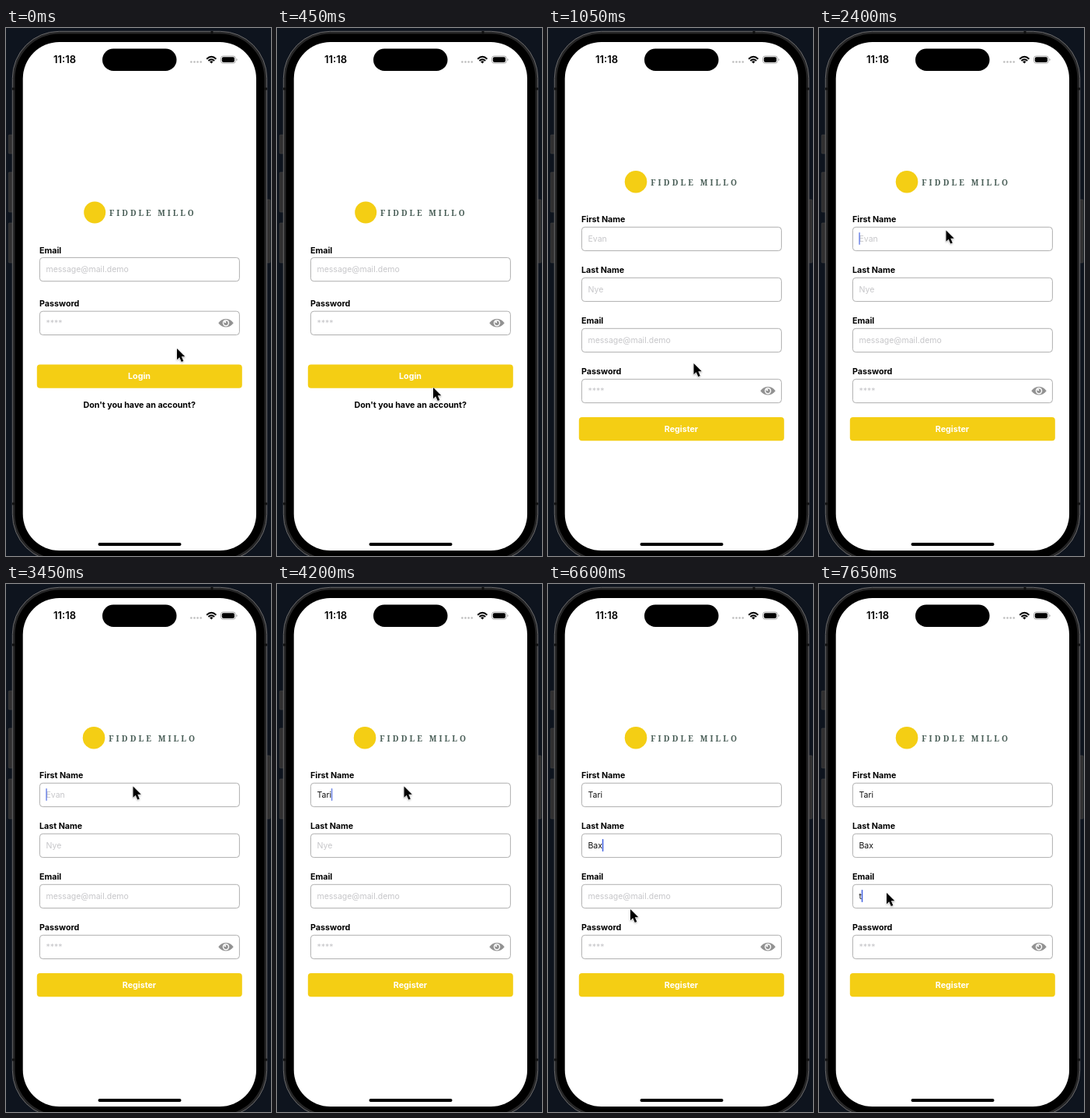
An HTML page that plays this animation: 341 px wide and 677 px high, repeating every 8 s.

```html
<!DOCTYPE html>
<html lang="en">
<head>
<meta charset="utf-8">
<title>Sign up</title>
<style>
  html, body { margin: 0; width: 100%; height: 100%; overflow: hidden; background: #0e141e; }
  svg { display: block; width: 100%; height: 100%; }
  text { font-family: Inter, "Liberation Sans", sans-serif; font-size: 10.5px; fill: #111; white-space: pre; }
  .bold { font-size: 10.7px; font-weight: 700; fill: #000; }
  .mid { text-anchor: middle; }
  .white { fill: #fff; }
  .hint { fill: #c6c6c9; }
  .brand { font: 700 10px "Noto Serif", "Liberation Serif", serif; letter-spacing: 3px; fill: #495e57; }
  .clock { font-size: 13px; font-weight: 600; fill: #000; }
</style>
</head>
<body>
<svg viewBox="0 0 341 677">
  <defs>
    <g id="eye">
      <path d="M-9.7 0C-5 -7 5 -7 9.7 0C5 7 -5 7 -9.7 0Z" fill="#929292"/>
      <circle r="4.2" fill="#fff"/>
      <circle r="2.8" fill="#929292"/>
      <circle cx="-1" cy="-1.2" r="1.2" fill="#fff"/>
    </g>
  </defs>

  <rect width="341" height="677" fill="#0e141e"/>
  <g fill="#302f30" stroke="#454546" stroke-width=".6">
    <rect x="3.3" y="137" width="6" height="24" rx="1"/>
    <rect x="3.3" y="185" width="6" height="51" rx="1"/>
    <rect x="3.3" y="250" width="6" height="51" rx="1"/>
    <rect x="334" y="220" width="6" height="81" rx="1"/>
  </g>
  <rect x="8.3" y="4.3" width="327.4" height="679.4" rx="60" fill="#262627" stroke="#68686a"/>
  <rect x="11.5" y="7.5" width="321" height="673" rx="57" fill="#000"/>
  <path d="M8 78h3.5M332.5 78h3.5M8 610h3.5M332.5 610h3.5M265 4v3.5" stroke="#111" stroke-width="3"/>
  <rect x="21.7" y="18" width="300.3" height="652" rx="47" fill="#fff"/>

  <rect x="124" y="26.5" width="95.5" height="28.5" rx="14.2" fill="#000"/>
  <text class="clock" x="61" y="45.3">11:18</text>
  <path d="M238.4 43.5h13" stroke="#bcbcbc" stroke-width="2.6" stroke-linecap="round" stroke-dasharray="0 4.1"/>
  <g fill="none" stroke="#000" stroke-width="1.9">
    <path d="M258.2 39.7Q264.3 33.9 270.4 39.7"/>
    <path d="M260.4 42Q264.3 38.4 268.2 42"/>
    <path d="M262.1 43.3Q264.3 41.4 266.5 43.3L264.3 45.6Z" fill="#000" stroke="none"/>
  </g>
  <rect x="276.5" y="36" width="18.8" height="9.2" rx="2.9" fill="none" stroke="#a0a0a0" stroke-width=".9"/>
  <rect x="277.8" y="37.3" width="16.2" height="6.6" rx="1.8" fill="#000"/>
  <path d="M296.5 39v3.2q1.2-.5 1.2-1.6t-1.2-1.6" fill="#a0a0a0"/>
  <rect x="118.5" y="660" width="107" height="4" rx="2" fill="#000"/>

  <g id="login"></g>
  <g id="signup"></g>
  <rect id="caret" width="1.5" height="16" rx=".7" fill="#3f5fe0"/>
  <path id="mouse" d="M0 0V14.3L3.2 11.3L5.8 17L8.3 15.9L5.8 10.3H10.3Z"
    fill="#000" stroke="#fff" stroke-linejoin="round" paint-order="stroke"
    style="filter:drop-shadow(0 1px 1px rgba(0,0,0,.3))"/>
</svg>
<script>
const $ = id => document.getElementById(id);
const LOOP = 8000, STEP = 150;
const MAIL = "message@mail.demo";

const label = (str, y) => `<text class="bold" x="43" y="${y}">${str}</text>`;
const input = (y, hint, id) =>
  `<rect x="43.4" y="${y}" width="257" height="30.3" rx="4" fill="#fff" stroke="#a6a6a6" stroke-width=".9"/>
   <text class="hint" id="${id}" x="51.5" y="${y + 19}">${hint}</text>`;
const secret = (id, y) => input(y, "****", id) + `<use href="#eye" x="283" y="${y + 15}"/>`;
const button = (str, y) =>
  `<rect x="39.8" y="${y}" width="264" height="30.3" rx="4" fill="#f4ce14"/>
   <text class="bold mid white" x="171.5" y="${y + 19}">${str}</text>`;
const brand = (y, scale) =>
  `<g transform="translate(172.2 ${y}) scale(${scale})">
     <circle cx="-58" r="14" fill="#f4ce14"/>
     <text class="brand" x="-39.2" y="4.5">FIDDLE MILLO</text>
   </g>`;

$("login").innerHTML = brand(236.5, 1) +
  label("Email", 288.7) + input(294.4, MAIL, "loginMail") +
  label("Password", 357.4) + secret("loginPass", 363.2) +
  button("Login", 431.4) +
  `<rect id="press" x="98" y="475.5" width="147.5" height="16" rx="1" fill="#bdbdbd"/>
   <text class="bold mid" x="171.7" y="487.4">Don't you have an account?</text>`;

$("signup").innerHTML = brand(197.2, 1.02) +
  label("First Name", 249.2) + input(255.3, "", "first") +
  label("Last Name", 314.2) + input(320.3, "", "last") +
  label("Email", 379.2) + input(385.3, "", "mail") +
  label("Password", 444.2) + secret("pass", 450.3) +
  button("Register", 499);

// [time, x, y] of the pointer tip
const path = [
  [0, 220, 411], [150, 218, 417], [300, 211, 437], [450, 201, 461], [600, 192, 479],
  [750, 187.5, 487], [900, 187.5, 487], [1050, 187.5, 430], [1200, 190, 375],
  [1350, 182, 315], [1500, 170, 277], [1650, 164, 261], [1800, 163.5, 259.5],
  [4200, 163.5, 259.5], [4350, 150, 268], [4500, 108, 306], [4650, 76, 328], [4800, 68, 333],
  [6150, 68, 333], [6300, 76, 352], [6450, 96, 396], [6600, 106, 417],
  [6900, 97, 405], [7050, 89, 398], [7200, 87, 396], [LOOP, 87, 396]
];

// typed: [time, letters shown]
const fields = [
  { id: "first", hint: "Evan", value: "Tari", typed: [[3600, 2], [3750, 4]], from: 1800, to: 5100, y: 262 },
  { id: "last", hint: "Nye", value: "Bax", typed: [[5550, 2], [5700, 3]], from: 5100, to: 7200, y: 327 },
  { id: "mail", hint: MAIL, value: "t", typed: [[7650, 1]], from: 7200, to: LOOP, y: 392 }
];

// caret blinks: [first dimmed step, time back on]
const blinks = [[2400, 2850], [3450, 3600], [4200, 4800], [6300, 6600]];

function pointer(t) {
  const i = path.findIndex(p => p[0] > t);
  const [t0, x0, y0] = path[i - 1], [t1, x1, y1] = path[i];
  const k = (t - t0) / (t1 - t0);
  return [x0 + (x1 - x0) * k, y0 + (y1 - y0) * k];
}

function caretAlpha(t) {
  const b = blinks.find(([a, z]) => t >= a && t < z);
  return !b ? 1 : t < b[0] + STEP ? 0.75 : 0;
}

function draw(ms) {
  const t = Math.floor((ms % LOOP) / STEP) * STEP;
  const joined = t >= 1050;
  $("login").style.display = joined ? "none" : "";
  $("signup").style.display = joined ? "" : "none";
  $("press").style.opacity = t >= 900 ? 1 : 0;

  let alpha = 0;
  for (const f of fields) {
    const n = f.typed.reduce((len, [at, count]) => t >= at ? count : len, 0);
    const el = $(f.id);
    el.textContent = n ? f.value.slice(0, n) : f.hint;
    el.setAttribute("class", n ? "" : "hint");
    if (t >= f.from && t < f.to) {
      alpha = caretAlpha(t);
      $("caret").setAttribute("x", 51.3 + (n ? el.getComputedTextLength() : 0));
      $("caret").setAttribute("y", f.y);
    }
  }
  $("caret").style.opacity = alpha;
  $("mouse").setAttribute("transform", `translate(${pointer(t)})`);
}

let start;
function tick(now) {
  start ??= now;
  draw(now - start);
  requestAnimationFrame(tick);
}
draw(0);
requestAnimationFrame(tick);
</script>
</body>
</html>
```
